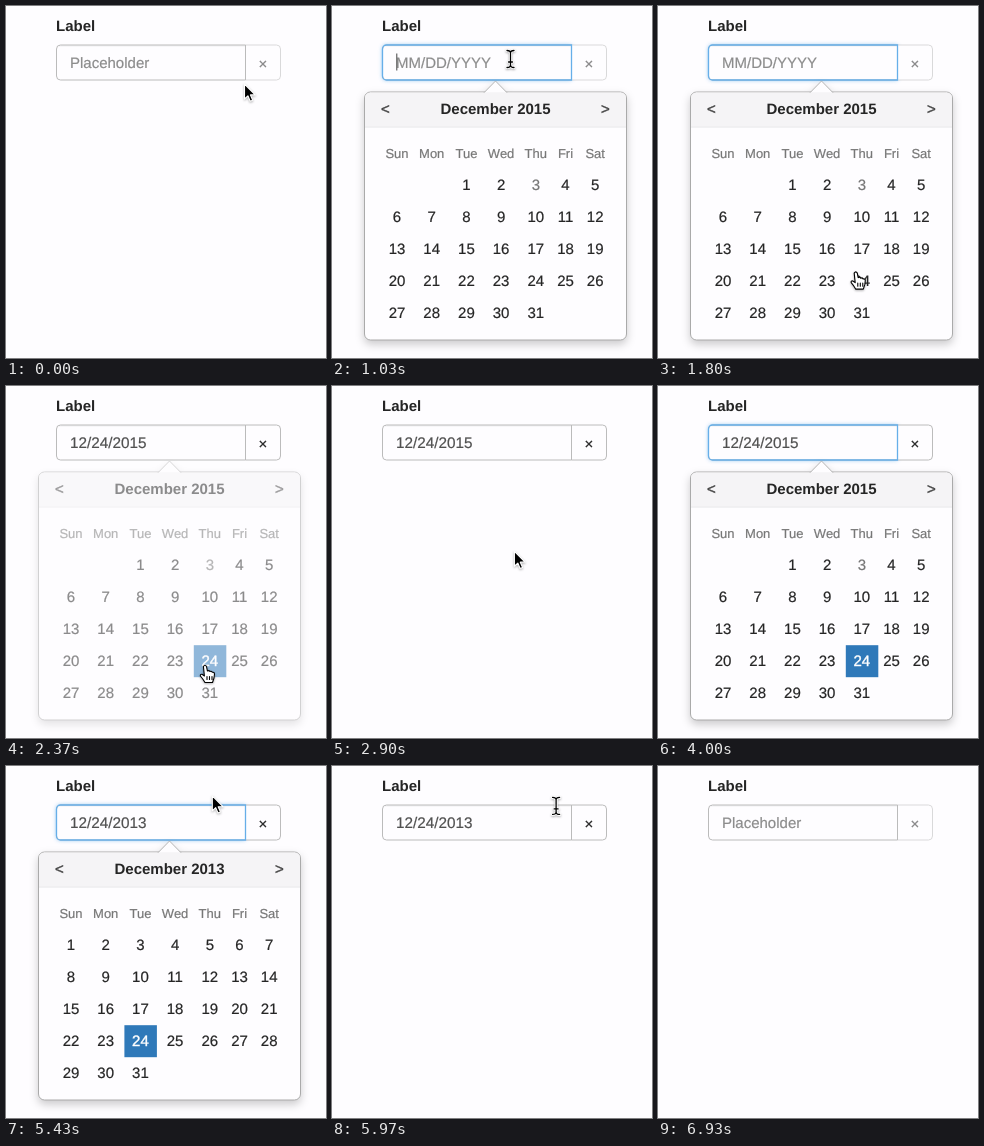
Write an HTML page that moves like this. It is 320x352 px and loops after 7310 ms.

```html
<!DOCTYPE html>
<html lang="en">
<head>
<meta charset="utf-8">
<title>Date picker</title>
<style>
  html, body { margin: 0; width: 100%; height: 100%; overflow: hidden; background: #fefdff; }
  svg { display: block; width: 320px; height: 352px; }
  text {
    font: 15px "Liberation Sans", Arial, sans-serif; text-rendering: geometricPrecision; white-space: pre;
    color: #252525; fill: currentColor; stroke: currentColor; stroke-width: .2px;
  }
  .bold { font-weight: bold; stroke: none; }
  .mid { text-anchor: middle; }
  .week { font-size: 13px; color: #777; }
  .nav { color: #444; stroke-width: .4px; }
  .muted { color: #777; }
  .on { color: #fff; stroke-width: .4px; }
  #pop { filter: drop-shadow(0 4px 4px rgba(0, 0, 0, .2)); }
  #cursor { filter: drop-shadow(0 1px 1px rgba(0, 0, 0, .3)); }
</style>
</head>
<body>
<svg viewBox="0 0 320 352">
  <defs>
    <filter id="blur" x="-10%" y="-50%" width="120%" height="200%"><feGaussianBlur stdDeviation="2.3"/></filter>
    <path id="field" d="M239.5 39.5H54.5a4 4 0 0 0-4 4v27a4 4 0 0 0 4 4H239.5Z"/>
    <path id="addon" d="M239.5 39.5H270.5a4 4 0 0 1 4 4v27a4 4 0 0 1-4 4H239.5"/>
    <path id="stem" d="M-3.5-8.5Q0-8.5 0-6Q0-8.5 3.5-8.5M0-6V6M-3.5 8.5Q0 8.5 0 6Q0 8.5 3.5 8.5M-2 3H2"/>
  </defs>

  <g transform="translate(0 -.5)">
    <text class="bold" x="50" y="25.5">Label</text>

    <use id="glow" href="#field" fill="#66afe9" filter="url(#blur)"/>
    <use href="#addon" fill="#fefdff"/>
    <g id="clear">
      <use href="#addon" fill="none" stroke="#bcbcbc"/>
      <text class="mid" x="257" y="63.3">×</text>
    </g>
    <use href="#field" fill="#fefdff" stroke="#bbb"/>
    <path d="M53 40.5H239" stroke="#000" stroke-opacity=".06"/>
    <use id="ring" href="#field" fill="none" stroke="#66afe9" stroke-width="1.3"/>
    <text id="value" x="64" y="62"></text>
    <path id="caret" d="M.8 48V65" stroke="#444"/>

    <g id="pop">
      <rect x="32.5" y="86.5" width="262" height="248" rx="6" fill="#fefdff" stroke="#aaa"/>
      <path d="M33 121V92.5a5.500 5.500 0 0 1 5.500-5.500H288.500a5.500 5.500 0 0 1 5.500 5.500V121Z" fill="#f5f4f6"/>
      <path d="M33 121.500H294" stroke="#e6e5e7"/>
      <path d="M152 87.200L163.500 75.500L175 87.200" fill="#fefdff" stroke="#b3b3b3"/>
      <text class="nav mid" x="53.500" y="108.500">&lt;</text>
      <text class="nav mid" x="273.500" y="108.500">&gt;</text>
    </g>
  </g>

  <g id="cursor" stroke-linejoin="round" stroke-linecap="round">
    <path id="arrow" d="M0 0V15L3.400 11.800L5.700 17.200L8.200 16.200L5.900 10.900H10.700Z" fill="#000" stroke="#fff" stroke-width="1.100"/>
    <path id="hand" d="M-1.600 1.500Q0-1 1.500 1.500L2.400 6Q4 5 5 6.500Q6.500 5.800 7.300 7.300Q9.300 6.800 9.500 9L9 13L7.500 17.500H0Q-2 14-4.600 11Q-5 9-3 9.300L-.6 11ZM2 11.500V14.500M4.500 11.500V14.500M7 11.500V14.500" fill="#fff" stroke="#000" stroke-width="1.100"/>
    <g id="beam" fill="none">
      <use href="#stem" stroke="#fff" stroke-width="3"/>
      <use href="#stem" stroke="#000" stroke-width="1.300"/>
    </g>
  </g>
</svg>
<script>
const LOOP = 7310, FADE = 150, BLINK = 500;
const $ = id => document.getElementById(id);
const show = (el, on) => { el.style.display = on ? '' : 'none'; };

// What the user does, in ms
const visits = [
  { focus: 600, caret: 1030, blur: 1970, close: 2300 },
  { focus: 3170, caret: 3300, blur: 5430, close: 5450 },
];
const pick = 2070, erase = 4070, retype = 4370, clear = 6430;
const hidden = { from: 4000, to: 4870, end: 6930 };
const moves = [
  { from: 30, to: 400, x: 178.5, y: 53 },
  { from: 1230, to: 1900, x: 199, y: 279 },
  { from: 2670, to: 3130, x: 166, y: 53 },
  { from: hidden.from, to: hidden.from, x: 134, y: 257 },
  { from: hidden.to, to: 5230, x: 206.3, y: 29.8 },
  { from: 5830, to: 6170, x: 254, y: 57 },
  { from: 6890, to: 6920, x: 272, y: 76 },
];

function add(parent, tag, attrs, content = '') {
  const el = document.createElementNS('http://www.w3.org/2000/svg', tag);
  for (const key in attrs) el.setAttribute(key, attrs[key]);
  el.textContent = content;
  parent.append(el);
  return el;
}

// Columns are wider up to Thursday
const colX = i => 65 + 34.7 * Math.min(i, 4) + 29.7 * Math.max(i - 4, 0);

function month(year, first, today) {
  const g = add($('pop'), 'g', {});
  add(g, 'text', { class: 'bold mid', x: 163.5, y: 108 }, 'December ' + year);
  const days = Array.from({ length: 31 }, (_, i) => {
    const cell = i + first;
    const place = { x: colX(cell % 7), y: 184.7 + 32 * Math.floor(cell / 7) };
    return add(g, 'text', { class: i + 1 === today ? 'mid muted' : 'mid', ...place }, i + 1);
  });
  const label = days[23];
  const rect = add(g, 'rect', { x: label.getAttribute('x') - 16, y: 259.7, width: 32.5, height: 32, fill: '#2f79b9' });
  g.prepend(rect);
  return { g, rect, label };
}

['Sun', 'Mon', 'Tue', 'Wed', 'Thu', 'Fri', 'Sat'].forEach((name, i) =>
  add($('pop'), 'text', { class: 'mid week', x: colX(i), y: 152.7 }, name));
const before = month(2015, 2, 3);
const after = month(2013, 0);

const ramp = (t, from, length) => Math.max(0, Math.min(1, (t - from) / (length || 1)));
const pulse = (t, from, to) => ramp(t, from, FADE) - ramp(t, to, FADE);
const sum = f => visits.reduce((total, v) => total + f(v), 0);

function valueAt(t) {
  if (t < visits[0].focus || t >= clear) return 'Placeholder';
  if (t < pick) return 'MM/DD/YYYY';
  if (t < erase) return '12/24/2015';
  return t < retype ? '12/24/201' : '12/24/2013';
}

// The caret blinks from the latest keystroke or focus
function caretOn(t) {
  if (!visits.some(v => t >= v.caret && t < v.blur) || (t >= hidden.from && t < erase)) return false;
  const last = Math.max(...[...visits.map(v => v.caret), erase, retype].filter(s => s <= t));
  return Math.floor((t - last) / BLINK) % 2 === 0;
}

function pointer(t) {
  let x = 238.5, y = 78;
  for (const m of moves.filter(m => t >= m.from)) {
    const p = ramp(t, m.from, m.to - m.from);
    const e = m.to > m.from ? p * p * (3 - 2 * p) : 1;
    x += (m.x - x) * e;
    y += (m.y - y) * e;
  }
  return [x, y];
}

function shape(x, y, open) {
  if (y > 39 && y < 75 && x > 50 && x < 275) return x < 240 ? 'beam' : 'hand';
  return open && y > 164 && y < 324 ? 'hand' : 'arrow';
}

function render(t) {
  const open = sum(v => pulse(t, v.focus + 130, v.close));
  const glow = sum(v => pulse(t, v.focus, v.blur));
  $('pop').style.opacity = open;
  show($('pop'), open > 0);
  $('ring').style.opacity = glow;
  $('glow').style.opacity = 0.8 * glow;

  const text = valueAt(t), filled = text[0] === '1';
  $('value').textContent = text;
  $('value').style.color = filled ? '#505050' : '#8c8c8c';
  $('value').style.fontSize = filled ? '15.3px' : '15px';
  $('clear').style.opacity = filled ? 1 : 0.55;

  show(before.g, t < retype);
  show(after.g, t >= retype);
  for (const { rect, label } of [before, after]) {
    show(rect, filled);
    label.classList.toggle('on', filled);
  }

  show($('caret'), caretOn(t));
  const typed = filled ? $('value').getComputedTextLength() : 0;
  $('caret').setAttribute('transform', `translate(${64 + typed})`);

  const [x, y] = pointer(t);
  const kind = shape(x, y, open > 0);
  show($('cursor'), t < hidden.from || (t >= hidden.to && t < hidden.end));
  $('cursor').setAttribute('transform', `translate(${x} ${y})`);
  for (const id of ['arrow', 'hand', 'beam']) show($(id), id === kind);
}

const start = performance.now();
function tick() {
  render((performance.now() - start) % LOOP);
  requestAnimationFrame(tick);
}
tick();
</script>
</body>
</html>
```
